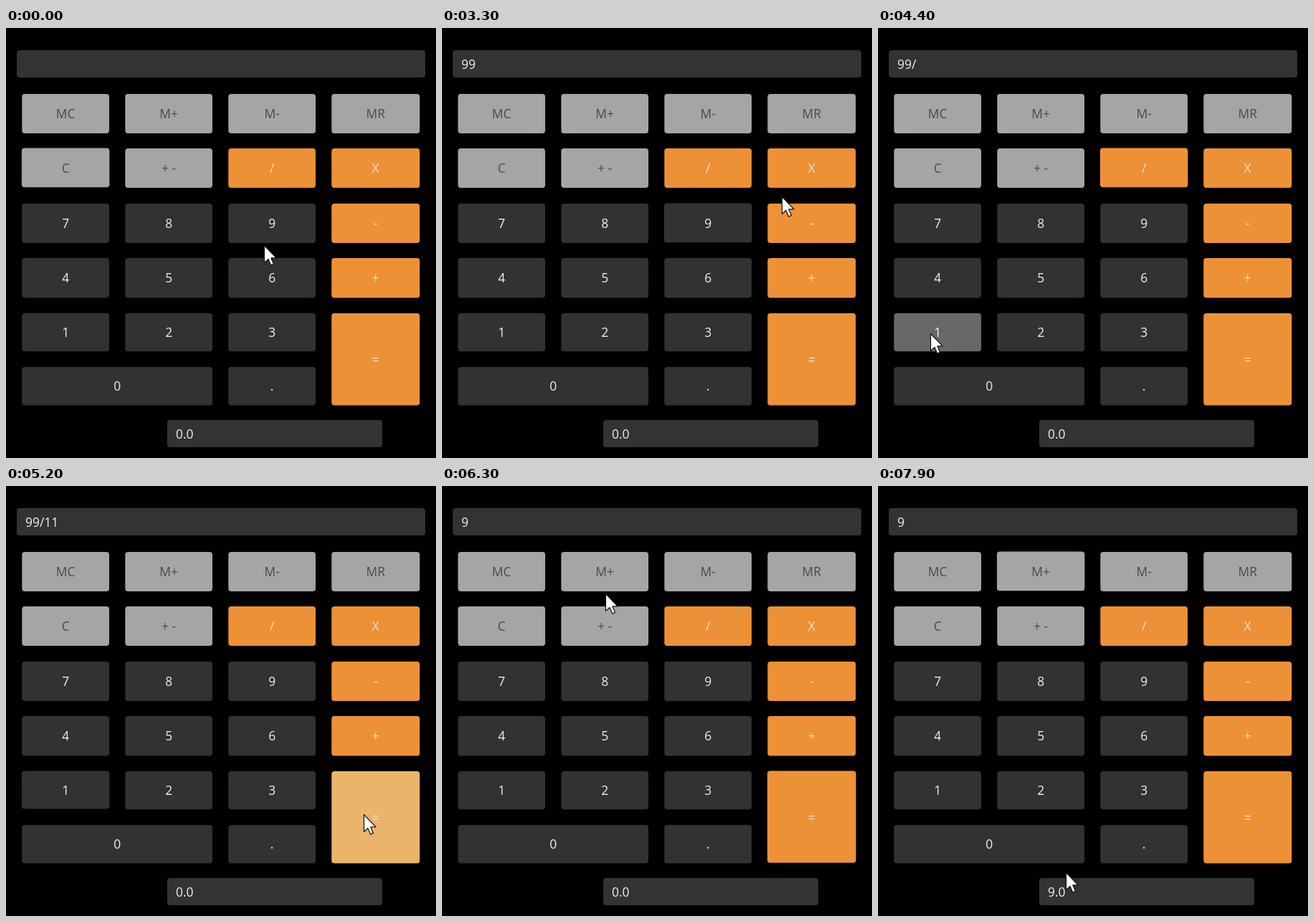
Animation of 600 by 600 pixels, one loop 8000 ms. Source, as an HTML page:

```html
<!DOCTYPE html>
<html lang="en">
<head>
<meta charset="utf-8">
<title>Calculator</title>
<style>
  html, body { margin: 0; width: 100%; height: 100%; overflow: hidden; background: #000; }
  svg { display: block; width: 600px; height: 600px; }
  text { font: 17.4px "Open Sans", "Noto Sans", sans-serif; fill: #efeff0; }
  .label { text-anchor: middle; }
  .field { fill: #343235; }
  .grey rect { fill: #a3a6a2; }
  .grey text { fill: #4a4b4a; }
  .grey.hover rect { fill: #d2d4d1; }
  .dark rect { fill: #333134; }
  .dark.hover rect { fill: #69676a; }
  .orange rect { fill: #ed9137; }
  .orange text { fill: #f8e6d2; }
  .orange.hover rect { fill: #ebb46b; }
</style>
</head>
<body>
<svg id="stage" viewBox="0 0 600 600"></svg>
<script>
const LOOP = 8000, STEP = 100;
const stage = document.getElementById('stage');

function add(parent, tag, attrs, content = '') {
  const el = document.createElementNS('http://www.w3.org/2000/svg', tag);
  for (const key in attrs) el.setAttribute(key, attrs[key]);
  el.textContent = content;
  parent.append(el);
  return el;
}

function addField(x, y, w) {
  add(stage, 'rect', { x, y, width: w, height: 38, rx: 4, class: 'field' });
  return add(stage, 'text', { x: x + 12, y: y + 25.5 });
}

// top edge and height of each button row
const ROWS = [[92, 55], [168, 55], [245, 55], [321, 55.5], [398, 53.3], [473, 53.5]];
const buttons = {};

function addButton(name, kind, col, row, colSpan = 1, rowSpan = 1) {
  const x = 22.3 + col * 144;
  const w = (col === 3 ? 123 : 121.7) + (colSpan - 1) * 144;
  const [y] = ROWS[row];
  const [lastY, lastH] = ROWS[row + rowSpan - 1];
  const h = lastY + lastH - y;
  const group = add(stage, 'g', { class: kind });
  const rect = add(group, 'rect', { rx: 4 });
  add(group, 'text', { x: x + w / 2, y: y + h / 2 + 6.4, class: 'label' }, name);
  buttons[name] = { x, y, w, h, kind, group, rect };
}

const expression = addField(15, 31, 570);
const memory = addField(225, 547, 300);

['MC', 'M+', 'M-', 'MR'].forEach((name, i) => addButton(name, 'grey', i, 0));
['C', '+ -'].forEach((name, i) => addButton(name, 'grey', i, 1));
['/', 'X'].forEach((name, i) => addButton(name, 'orange', i + 2, 1));
['789', '456', '123'].forEach((digits, r) =>
  [...digits].forEach((name, i) => addButton(name, 'dark', i, r + 2)));
['-', '+'].forEach((name, i) => addButton(name, 'orange', 3, i + 2));
addButton('0', 'dark', 0, 5, 2);
addButton('.', 'dark', 2, 5);
addButton('=', 'orange', 3, 4, 1, 2);

const cursor = add(stage, 'path', {
  d: 'M0 0V24L5.5 19L9.2 27.6L13 26L9.4 17.4H16.6Z',
  fill: '#fff', stroke: '#111', 'stroke-width': 1.2, 'stroke-linejoin': 'round'
});

// time, x, y of the pointer tip
const PATH = [
  [0, 360, 303], [1000, 360, 303], [1400, 367, 300], [1500, 367, 300],
  [1900, 370, 278], [3000, 370, 278], [3300, 474, 235], [3800, 371, 196],
  [3900, 371, 196], [4400, 73, 426], [4800, 73, 426], [5200, 499, 458],
  [5700, 499, 458], [6300, 228, 150], [6500, 227, 120], [7000, 227, 120],
  [7400, 258, 534], [7900, 262, 539], [LOOP, 262, 539]
];
const FOCUS = [[0, 'C'], [2500, '9'], [3800, '/'], [4500, '1'], [5500, '='], [6700, 'M+']];
const TYPED = [[0, ''], [2600, '9'], [3000, '99'], [3900, '99/'], [4600, '99/1'],
  [4800, '99/11'], [5600, '9']];
const STORED = [[0, '0.0'], [6800, '9.0']];

const valueAt = (table, t) => table.filter(([start]) => start <= t).pop()[1];
const ease = p => p * p * (3 - 2 * p);

function pointerAt(t) {
  const i = PATH.findIndex(([time]) => time > t);
  const [t0, x0, y0] = PATH[i - 1], [t1, x1, y1] = PATH[i];
  const p = ease((t - t0) / (t1 - t0));
  return [x0 + (x1 - x0) * p, y0 + (y1 - y0) * p];
}

function draw(t) {
  const [px, py] = pointerAt(t);
  const focused = valueAt(FOCUS, t);
  for (const name in buttons) {
    const { x, y, w, h, kind, group, rect } = buttons[name];
    const over = px >= x && px <= x + w && py >= y && py <= y + h;
    group.setAttribute('class', over ? kind + ' hover' : kind);
    // a focused button sits slightly wider and higher
    const grow = name === focused ? 0.35 : 0;
    rect.setAttribute('x', x - grow);
    rect.setAttribute('y', y - grow * 1.5);
    rect.setAttribute('width', w + grow * 2);
    rect.setAttribute('height', h - grow);
  }
  expression.textContent = valueAt(TYPED, t);
  memory.textContent = valueAt(STORED, t);
  cursor.setAttribute('transform', `translate(${px + 0.5} ${py + 0.5})`);
}

const start = performance.now();
function tick() {
  const t = (performance.now() - start) % LOOP;
  draw(Math.floor(t / STEP) * STEP);
  requestAnimationFrame(tick);
}
tick();
</script>
</body>
</html>
```
